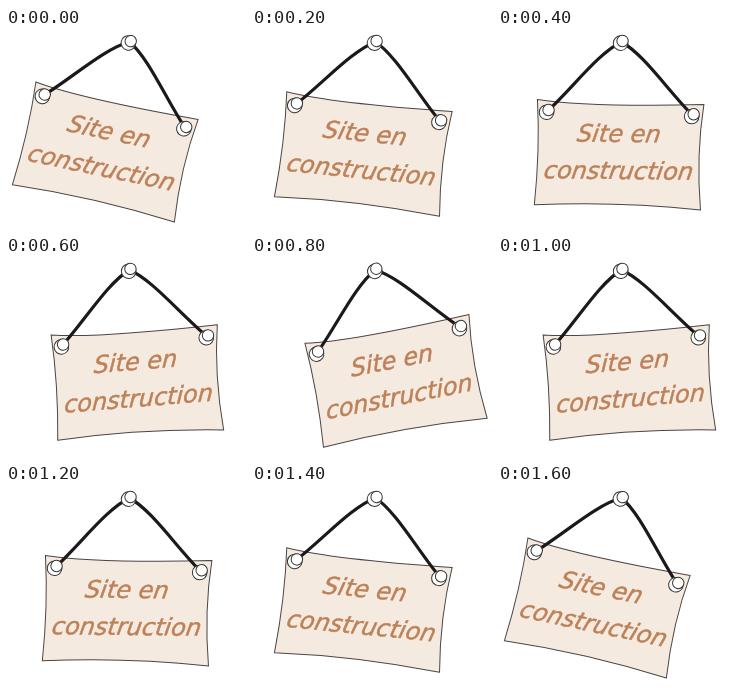
An HTML page for the animation above (1800 ms loop, 240 px wide and 200 px high).

```html
<!DOCTYPE html>
<html lang="fr">
<head>
<meta charset="utf-8">
<title>Site en construction</title>
<style>
  html, body { margin: 0; width: 100%; height: 100%; overflow: hidden; background: #fff; }
  svg { display: block; width: 240px; height: 200px; }
  text { font: italic 24px "DejaVu Sans", sans-serif; fill: #bd8158; stroke: #bd8158; stroke-width: .5; text-anchor: middle; }
  .sheet { fill: #f5eae0; stroke: #4a4644; stroke-width: 1; }
  .rope { fill: none; stroke: #1c191a; stroke-width: 3.2; }
  .pin { fill: #fff; stroke: #333; stroke-width: 1; }
</style>
</head>
<body>
<svg viewBox="0 0 240 200">
  <defs>
    <g id="pin" class="pin">
      <circle cx="-.9" cy="1.2" r="7.3"/>
      <circle cx="1" cy="-1.1" r="5.7"/>
    </g>
  </defs>
  <!-- The sign hangs from the origin, so it swings by rotation alone. -->
  <g id="sign">
    <path class="sheet" d="M-82.2 60C-45 65 25 63 84.3 60Q78 110 84.2 165.4Q0 159 -82 165.5Q-78 110 -82.2 60Z"/>
    <g transform="rotate(-1.2)">
      <text transform="translate(-2.5 100) skewX(-8)">Site en</text>
      <text transform="translate(-2.5 137) skewX(-8)">construction</text>
    </g>
    <path class="rope" d="M-71.8 71.4C-48 48 -22 11 0 0C22 11 48 47 73.4 71.1"/>
    <use href="#pin"/>
    <use href="#pin" x="-71.8" y="71.4"/>
    <use href="#pin" x="73.4" y="71.1"/>
  </g>
</svg>
<script>
  const STEP = 200;
  const swing = [13, 6.8, 1.8, -3.5, -10];
  const angles = [...swing, ...swing.slice(0, -1).reverse()];
  const sign = document.getElementById("sign");

  function draw() {
    const angle = angles[Math.floor(performance.now() / STEP) % angles.length];
    sign.setAttribute("transform", `translate(123.5 14) rotate(${angle})`);
    requestAnimationFrame(draw);
  }
  draw();
</script>
</body>
</html>
```
